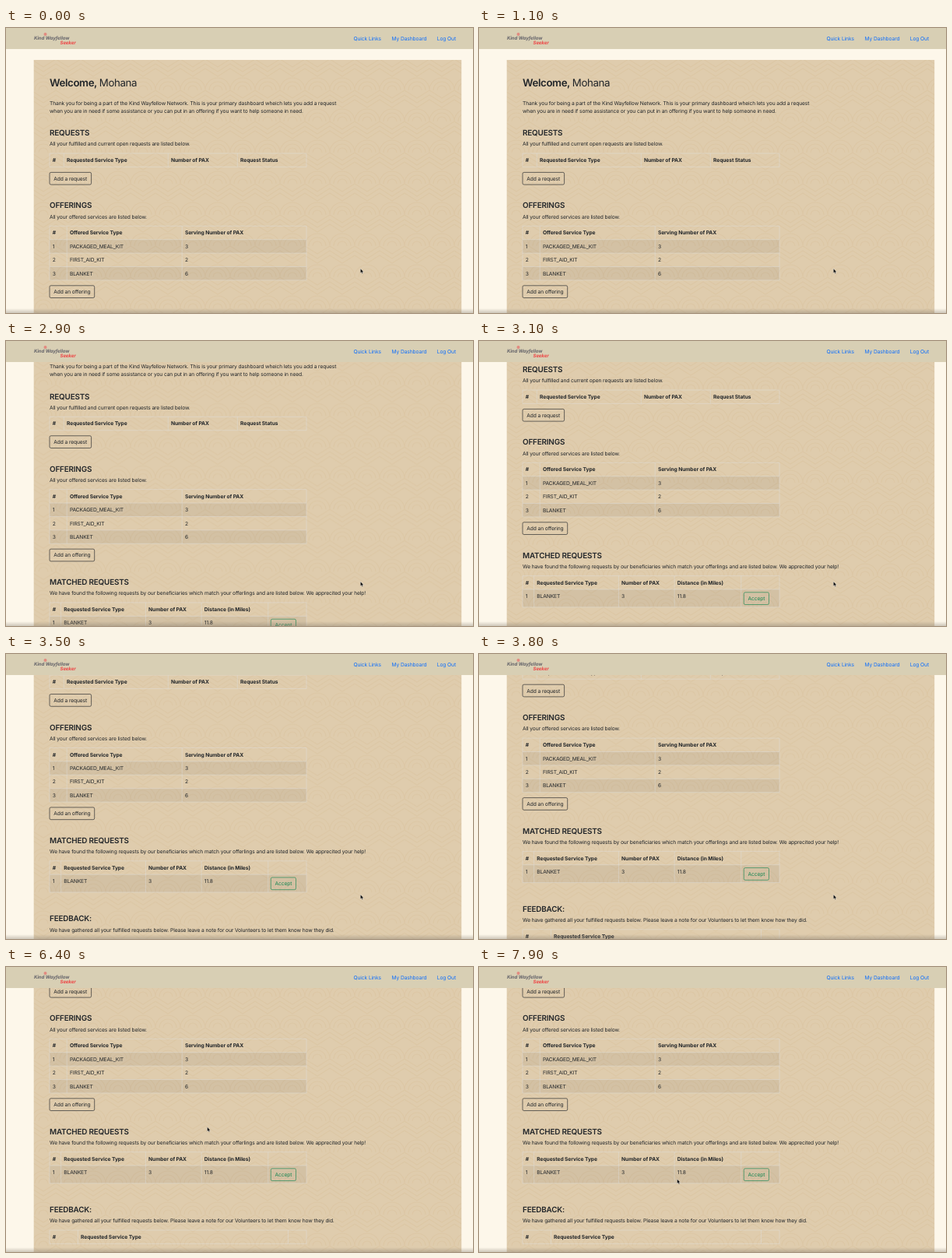
An HTML page for the animation above (8 s loop, 600 by 366 pixels).

```html
<!DOCTYPE html>
<html lang="en">
<head>
<meta charset="utf-8">
<title>Dashboard</title>
<style>
html, body { margin: 0; width: 100%; height: 100%; overflow: hidden; background: #fdf7ea; }
svg { display: block; width: 100%; height: 100%; }
text { font: 6.7px Inter, sans-serif; letter-spacing: -.017em; fill: #212529; text-rendering: geometricPrecision; white-space: pre; }
.b { font-weight: 700; letter-spacing: -.012em; }
.h { font-size: 9.9px; font-weight: 600; }
.welcome { font-size: 13.3px; letter-spacing: -.03em; }
.link { fill: #0d6efd; }
.green { fill: #198754; }
.logo { font-size: 6.1px; font-weight: 700; font-style: italic; fill: #66656b; }
.red { fill: #ee4444; }
</style>
</head>
<body>
<svg viewBox="0 0 600 366" preserveAspectRatio="none">
  <defs>
    <pattern id="waves" width="64" height="40" patternUnits="userSpaceOnUse">
      <g fill="none" stroke="#b88d50" stroke-opacity=".09" stroke-width="1.1">
        <path d="M0 0L16 10 32 0 48 10 64 0M0 6L16 16 32 6 48 16 64 6M0 12L16 22 32 12 48 22 64 12"/>
        <path d="M0 40A16 16 0 0 1 32 40A16 16 0 0 1 64 40M5 40A11 11 0 0 1 27 40M37 40A11 11 0 0 1 59 40M10 40A6 6 0 0 1 22 40M42 40A6 6 0 0 1 54 40"/>
      </g>
    </pattern>
    <linearGradient id="shade" x2="0" y2="1">
      <stop stop-color="#80786c" stop-opacity="0"/>
      <stop offset="1" stop-color="#80786c" stop-opacity=".38"/>
    </linearGradient>
  </defs>
  <g id="page">
    <rect x="35.7" y="41" width="549.5" height="600" fill="#dfccad"/>
    <rect x="35.7" y="41" width="549.5" height="600" fill="url(#waves)"/>
  </g>
  <g id="nav">
    <rect width="600" height="27" fill="#d8cfb4"/>
    <circle cx="50.5" cy="8" r="2" fill="#e28a80"/>
  </g>
  <rect y="360" width="600" height="6" fill="url(#shade)"/>
  <path id="cursor" d="M0 0V5.7L1.3 4.5 2.2 6.5 3.1 6.1 2.3 4.2H4Z" fill="#000" stroke="#fff" stroke-width=".35"/>
</svg>
<script>
const page = document.getElementById('page');
const nav = document.getElementById('nav');
const cursor = document.getElementById('cursor');

function add(parent, tag, attrs, content = '') {
  const el = document.createElementNS('http://www.w3.org/2000/svg', tag);
  for (const key in attrs) el.setAttribute(key, attrs[key]);
  el.textContent = content;
  parent.append(el);
}

// y is the vertical middle of the capitals
function label(x, y, content, cls = '', size = 6.7, parent = page) {
  add(parent, 'text', { x, y: y + size * .36, class: cls }, content);
}

function section(y, title, note) {
  label(56, y, title, 'h', 9.9);
  label(56, y + 14.4, note);
}

function table(top, edges, head, rows = [], height = 17.4) {
  const last = edges.length - 1;
  const width = edges[last] - edges[0];
  const bottom = top + 17.4 + rows.length * height;
  rows.forEach((row, i) => {
    const y = top + 17.4 + i * height;
    if (i % 2 === 0) add(page, 'rect', { x: edges[0], y, width, height, fill: '#000', 'fill-opacity': .055 });
    row.forEach((cell, c) => label(edges[c] + 3.7, y + 8.7, cell));
  });
  head.forEach((cell, c) => label(edges[c] + 3.7, top + 8.7, cell, 'b'));
  let d = edges.map(x => `M${x} ${top}V${bottom}`).join('');
  for (let i = -1; i <= rows.length; i++) {
    const y = i < 0 ? top : top + 17.4 + i * height;
    d += `M${edges[0]} ${y}H${edges[last]}`;
  }
  add(page, 'path', { d, fill: 'none', stroke: '#dee2e6', 'stroke-opacity': .75, 'stroke-width': .5 });
}

function button(x, y, width, content, color = '#212529', cls = '') {
  add(page, 'rect', { x, y, width, height: 15.7, rx: 1.8, fill: 'none', stroke: color, 'stroke-width': .65 });
  label(x + 5.3, y + 7.9, content, cls);
}

label(36, 13.3, 'Kind Wayfellow', 'logo', 6.1, nav);
label(69.5, 18.8, 'Seeker', 'logo red', 6.1, nav);
label(446.5, 13.4, 'Quick Links', 'link', 6.7, nav);
label(495.6, 13.4, 'My Dashboard', 'link', 6.7, nav);
label(553.8, 13.4, 'Log Out', 'link', 6.7, nav);

add(page, 'text', { x: 56, y: 74.6, class: 'welcome', 'font-weight': 600, style: 'font-weight:600' }, 'Welcome,');
label(119.8, 69.8, 'Mohana', 'welcome', 13.3);
label(56, 96.6, 'Thank you for being a part of the Kind Wayfellow Network. This is your primary dashboard wheich lets you add a request');
label(56, 106.7, 'when you are in need if some assistance or you can put in an offering if you want to help someone in need.');

section(134.6, 'REQUESTS', 'All your fulfilled and current open requests are listed below.');
table(161, [56, 74.3, 208.3, 297.3, 386], ['#', 'Requested Service Type', 'Number of PAX', 'Request Status']);
button(56, 185.4, 53.6, 'Add a request');

section(227.8, 'OFFERINGS', 'All your offered services are listed below.');
table(254.3, [56, 78.2, 226.2, 386], ['#', 'Offered Service Type', 'Serving Number of PAX'],
  [['1', 'PACKAGED_MEAL_KIT', '3'], ['2', 'FIRST_AID_KIT', '2'], ['3', 'BLANKET', '6']]);
button(56, 330.8, 57.7, 'Add an offering');

section(373.2, 'MATCHED REQUESTS', 'We have found the following requests by our beneficiaries which match your offerlings and are listed below. We apprecited your help!');
table(399.6, [56, 70.6, 179.4, 251.1, 336.8, 386], ['#', 'Requested Service Type', 'Number of PAX', 'Distance (in Miles)'],
  [['1', 'BLANKET', '3', '11.8']], 22.8);
button(340.3, 420.8, 32.2, 'Accept', '#198754', 'green');

section(473.6, 'FEEDBACK:', 'We have gathered all your fulfilled requests below. Please leave a note for our Volunteers to let them know how they did.');
table(500, [56, 92.4, 362.5, 386], ['#', 'Requested Service Type']);

// Keys are [time, value, speed], joined by cubic Hermite curves
function track(keys, t) {
  if (t <= keys[0][0]) return keys[0][1];
  for (let i = 1; i < keys.length; i++) {
    const [t0, a, va = 0] = keys[i - 1], [t1, b, vb = 0] = keys[i];
    if (t > t1) continue;
    const span = t1 - t0, u = (t - t0) / span, w = 1 - u;
    return w * w * ((1 + 2 * u) * a + u * span * va) + u * u * ((3 - 2 * u) * b - w * span * vb);
  }
  return keys[keys.length - 1][1];
}

const scroll = [[2500, 0, .05], [2600, 10.6, .15], [3100, 98, .15], [3800, 146.2, .045], [4200, 162]];
const mouseX = [[4800, 455.4], [6200, 258.6], [6600, 258.6], [7700, 254.6]];
const mouseY = [[4800, 309], [6200, 205.6], [6600, 205.6], [7700, 272.4]];

const start = performance.now();
function draw() {
  const t = Math.floor((performance.now() - start) % 8000 / 100) * 100;
  page.setAttribute('transform', `translate(0 ${-track(scroll, t)})`);
  cursor.setAttribute('transform', `translate(${track(mouseX, t)} ${track(mouseY, t)})`);
  requestAnimationFrame(draw);
}
draw();
</script>
</body>
</html>
```
